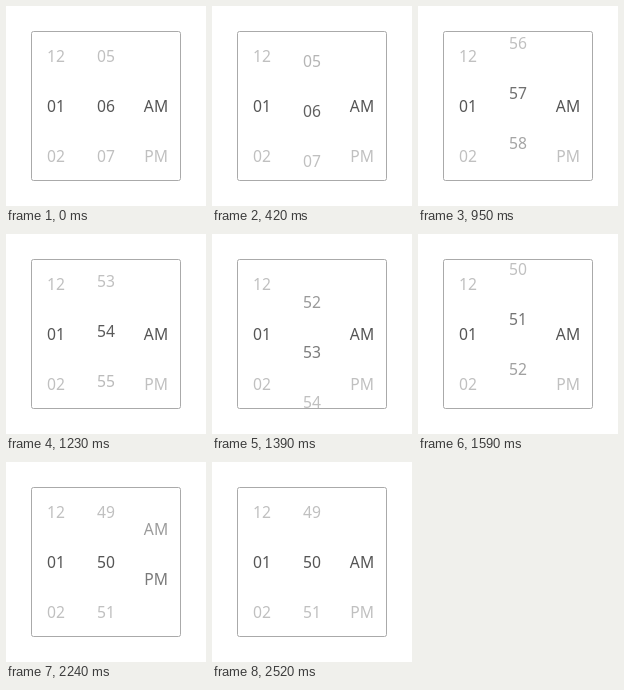
Animation of 200 by 200 pixels, one loop 3.85 s. Source, as an HTML page with a canvas:

```html
<!DOCTYPE html>
<html lang="en">
<head>
<meta charset="utf-8">
<title>Time picker</title>
<style>
  html, body { margin: 0; width: 100%; height: 100%; overflow: hidden; background: #fff; }
  canvas { display: block; width: 200px; height: 200px; }
</style>
</head>
<body>
<canvas id="picker"></canvas>
<script>
const LOOP = 3850, ROW = 50, MID = 100, DARK = 85, LIGHT = 192;
const canvas = document.getElementById('picker');
const ctx = canvas.getContext('2d');
const scale = window.devicePixelRatio || 1;
canvas.width = canvas.height = 200 * scale;

const HOURS = ['12', '01', '02'], HALVES = ['AM', 'PM'];
const pad = n => String(n).padStart(2, '0');
const minute = i => pad(((i % 60) + 60) % 60);
const listItem = list => i => list[i];

// The picture is refreshed every 40 ms, on a grid shifted by phase.
const step = (t, phase) => Math.floor((t - phase) / 40) * 40 + phase;

// Minutes spin from 06 back to 50 (-10), slowing at a constant rate.
function minutePos(t) {
  if (t < 380) return 6;
  if (t < 430) return 5.9;
  const left = Math.max(0, 2058 - step(t, 30));
  return -10 + (0.00243 * left) ** 2;
}

function backOut(u) {
  const v = Math.min(1, Math.max(0, u)) - 1;
  return 1 + 2.70158 * v ** 3 + 1.70158 * v ** 2;
}

function halfPos(t) {
  if (t < 2200) return backOut((step(t, 30) - 1600) / 300);
  return 1 - backOut((step(t, 0) - 2215) / 300);
}

function column(x, pos, label) {
  const near = Math.round(pos);
  for (let i = near - 2; i <= near + 2; i++) {
    const text = label(i);
    if (!text) continue;
    const off = i - pos;
    const c = Math.round(DARK + (LIGHT - DARK) * Math.min(1, Math.abs(off)));
    ctx.fillStyle = `rgb(${c},${c},${c})`;
    ctx.fillText(text, x, MID + 5.7 + off * ROW);
  }
}

function draw(t) {
  ctx.setTransform(scale, 0, 0, scale, 0, 0);
  ctx.fillStyle = '#fff';
  ctx.fillRect(0, 0, 200, 200);

  ctx.strokeStyle = '#aaa';
  ctx.lineWidth = 1;
  ctx.beginPath();
  ctx.roundRect(25.5, 25.5, 149, 149, 2);
  ctx.stroke();

  ctx.save();
  ctx.beginPath();
  ctx.rect(25, 25, 150, 150);
  ctx.clip();
  ctx.font = '15.7px "Noto Sans", "Open Sans", sans-serif';
  ctx.textAlign = 'center';
  ctx.textBaseline = 'alphabetic';
  column(50, 1, listItem(HOURS));
  column(100, minutePos(t), minute);
  column(150, halfPos(t), listItem(HALVES));
  ctx.restore();
}

const start = performance.now();
function tick() {
  draw((performance.now() - start) % LOOP);
  requestAnimationFrame(tick);
}
tick();
</script>
</body>
</html>
```
